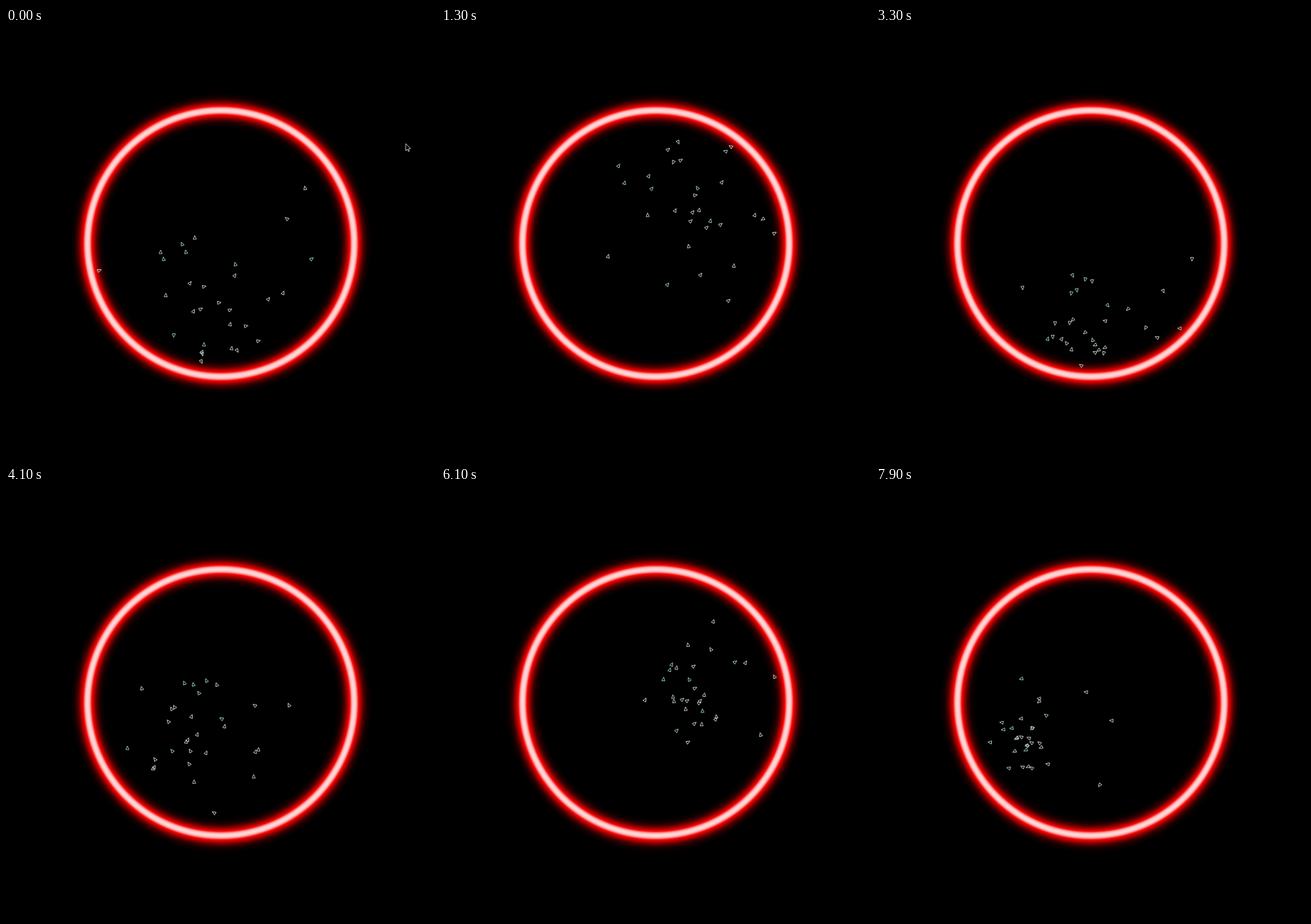
An HTML page with a canvas that plays this animation: 600x604 px, repeating every 8000 ms.

```html
<!DOCTYPE html>
<html>
<head>
<meta charset="utf-8">
<style>
html, body { margin: 0; width: 100%; height: 100%; overflow: hidden; background: #000; }
canvas { display: block; }
</style>
</head>
<body>
<canvas id="stage" width="600" height="604"></canvas>
<script>
const ctx = document.getElementById('stage').getContext('2d');
const LOOP = 8000, STEP = 100, LAST = LOOP - STEP;
const CX = 300.5, CY = 302, RING = 186.5, WALL = 175;
const COUNT = 30, STRAGGLERS = 4;

// Flock path: time, centre x, centre y, spread
const path = [
  [0, 270, 365, 72],
  [1300, 333, 245, 70],
  [1850, 350, 220, 66],
  [2400, 340, 265, 64],
  [3300, 290, 410, 60],
  [3700, 285, 415, 58],
  [4800, 228, 190, 36],
  [5600, 315, 370, 38],
  [6100, 340, 283, 36],
  [6500, 375, 220, 34],
  [7050, 395, 345, 30],
  [7900, 202, 352, 25]];

let seed = 11;
function rand() {
  seed = (seed * 16807) % 2147483647;
  return seed / 2147483647;
}
const bell = () => (rand() + rand() + rand() - 1.5) * 2;

const birds = Array.from({ length: COUNT }, (_, i) => {
  const angle = -0.9 + 1.8 * i / (STRAGGLERS - 1);
  const far = i < STRAGGLERS ? 110 + 70 * rand() : 0;
  return {
    dx: bell(), dy: bell(), farX: far * Math.cos(angle), farY: far * Math.sin(angle),
    phase: rand() * 6.28, rate: 0.001 + rand() * 0.0015, tilt: (rand() - 0.5) * 1.5
  };
});

function slope(i, c) {
  const a = path[Math.max(0, i - 1)], b = path[Math.min(path.length - 1, i + 1)];
  return (b[c] - a[c]) / (b[0] - a[0]);
}

function flock(t) {
  let i = 0;
  while (i < path.length - 2 && t >= path[i + 1][0]) i++;
  const a = path[i], b = path[i + 1], d = b[0] - a[0], u = (t - a[0]) / d;
  const h = u * u * (3 - 2 * u);
  const curve = c => a[c] * (1 - h) + b[c] * h
    + d * u * (1 - u) * ((1 - u) * slope(i, c) - u * slope(i + 1, c));
  return [curve(1), curve(2), curve(3)];
}

function place(bird, t) {
  const [fx, fy, spread] = flock(t);
  const turn = -0.6 * Math.sin(t / 900), c = Math.cos(turn), s = Math.sin(turn);
  const ox = bird.dx * spread + bird.farX, oy = bird.dy * spread + bird.farY;
  const p = bird.phase + bird.rate * t, sway = spread * 0.25;
  let x = fx + ox * c - oy * s + sway * Math.cos(p) - CX;
  let y = fy + ox * s + oy * c + sway * Math.sin(p) - CY;
  // Bounce back from the ring
  const r = Math.hypot(x, y);
  if (r > WALL) {
    const k = (2 * WALL - r) / r;
    x *= k;
    y *= k;
  }
  return [CX + x, CY + y];
}

function drawRing() {
  const reach = 28;
  const g = ctx.createRadialGradient(CX, CY, RING - reach, CX, CY, RING + reach);
  const stops = [[0, '#ffdada'], [2, '#ffcaca'], [3.5, '#ffa0a0'], [4.7, '#ff5050'],
    [6, '#f80808'], [8, '#c80000'], [11, '#800000'], [14, '#400000'], [18, '#160000'], [24, '#000']];
  for (const [d, color] of stops) {
    g.addColorStop(0.5 - d / reach / 2, color);
    g.addColorStop(0.5 + d / reach / 2, color);
  }
  ctx.fillStyle = g;
  ctx.fillRect(0, 0, 600, 604);
}

function drawBird(bird, i, t) {
  const [x, y] = place(bird, t);
  const a = Math.min(t, LAST - 60), p = place(bird, a), q = place(bird, a + 60);
  ctx.save();
  ctx.translate(x, y);
  ctx.rotate(Math.atan2(q[1] - p[1], q[0] - p[0]) + bird.tilt);
  ctx.beginPath();
  ctx.moveTo(3, 0);
  ctx.lineTo(-2.1, -2.2);
  ctx.lineTo(-2.1, 2.2);
  ctx.closePath();
  ctx.strokeStyle = i % 4 ? '#d2e0dc' : '#a8dcd2';
  ctx.lineWidth = 0.8;
  ctx.stroke();
  ctx.restore();
}

function drawCursor() {
  ctx.save();
  ctx.translate(559, 162);
  ctx.beginPath();
  ctx.moveTo(0, 0);
  ctx.lineTo(0, 10);
  ctx.lineTo(2.3, 8);
  ctx.lineTo(3.8, 11);
  ctx.lineTo(5.2, 10.3);
  ctx.lineTo(3.8, 7.4);
  ctx.lineTo(6.8, 7);
  ctx.closePath();
  ctx.strokeStyle = '#ccc';
  ctx.lineWidth = 0.9;
  ctx.stroke();
  ctx.restore();
}

function draw(now) {
  const t = Math.floor((now % LOOP) / STEP) * STEP;
  drawRing();
  birds.forEach((bird, i) => drawBird(bird, i, t));
  if (t < 400) drawCursor();
}

const start = performance.now();
function tick() {
  draw(performance.now() - start);
  requestAnimationFrame(tick);
}
tick();
</script>
</body>
</html>
```
